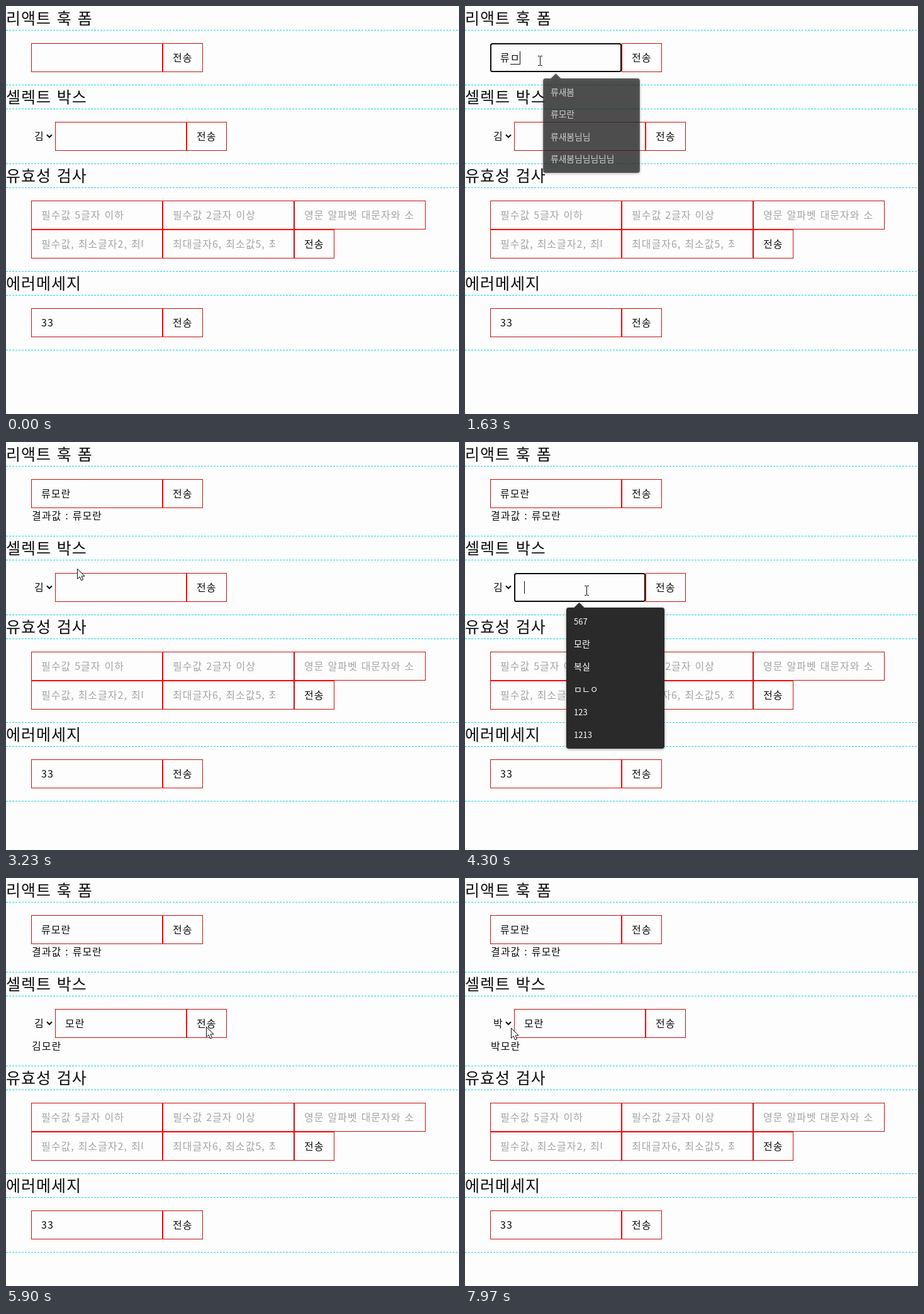
An HTML page with a canvas for the animation above (8000 ms loop, 720 by 648 pixels).

```html
<!DOCTYPE html>
<html lang="ko">
<head>
<meta charset="utf-8">
<style>
html, body { margin: 0; width: 100%; height: 100%; overflow: hidden; background: #fdfdfd; }
canvas { display: block; }
</style>
</head>
<body>
<canvas id="stage" width="720" height="648"></canvas>
<script>
const ctx = document.getElementById('stage').getContext('2d');
const LOOP = 8000;
const FONT = '"Noto Sans CJK KR", "Noto Sans CJK", "Noto Sans", sans-serif';
const PAPER = '#fdfdfd', INK = '#0c0c0c', HINT = '#a4a4a4', LINE = '#00d8e8';
const EDGE = '#c41414', SEAM = '#ff0000', POPUP = '#2a2a2a';
const INPUT_W = 209, BUTTON_W = 64, ROW_H = 46;

const SUBMIT_1 = 2750, SUBMIT_2 = 5850, SUBMIT_3 = 7460;
const MENU = ['김', '박', '말', '흉'];
const MENU_OPEN = [[3400, 3880], [6400, 7090]];

const TYPED_1 = [[640, ''], [1100, 'ㄹ'], [1220, '류'], [1570, '류ㅁ'], [1680, '류모'],
  [1760, '류몰'], [1820, '류모라'], [1890, '류모란']];
const TYPED_2 = [[4050, ''], [4500, 'ㅁ'], [4800, '모'], [4880, '몰'], [4950, '모라'], [5020, '모란']];

// Suggestion lists with their visible span and fade lengths
const POPUPS = [
  { x: 123, y: 114, from: 1230, to: 1578, fadeIn: 200, fadeOut: 200, items: ['류새봄', '류모란', '류새봄님님', '류새봄님님님님님'] },
  { x: 123, y: 114, from: 1780, to: 1930, fadeIn: 100, fadeOut: 200, items: ['류모란'] },
  { x: 161, y: 263, from: 4110, to: 4520, fadeIn: 170, fadeOut: 1, items: ['567', '모란', '복실', 'ㅁㄴㅇ', '123', '1213'] },
  { x: 161, y: 263, from: 4520, to: 4810, fadeIn: 1, fadeOut: 1, items: ['ㅁㄴㅇ'] },
  { x: 161, y: 263, from: 4810, to: 4908, fadeIn: 1, fadeOut: 200, items: ['모란'] }
];

// Pointer path: time, x, y
const PATH = [
  [30, 190, 12], [520, 119, 87], [2370, 119, 87], [2650, 285, 92], [2850, 285, 92],
  [3170, 130, 190], [3350, 66, 233], [3480, 66, 233], [3670, 64, 268], [3870, 64, 268],
  [4060, 193, 236], [5430, 193, 236], [5750, 318, 236], [5950, 318, 236], [6230, 95, 250],
  [6330, 66, 232], [6450, 66, 232], [6630, 75, 263], [6820, 62, 313], [7020, 66, 276],
  [7090, 66, 276], [7270, 318, 232], [7520, 318, 234], [7960, 73, 238]
];

const clamp = v => Math.max(0, Math.min(1, v));
const isOpen = t => MENU_OPEN.some(([a, b]) => t >= a && t < b);

function pointerAt(t) {
  let i = 0;
  while (i < PATH.length - 1 && PATH[i + 1][0] <= t) i++;
  const a = PATH[i], b = PATH[i + 1] || a;
  const p = clamp((t - a[0]) / (b[0] - a[0] || 1));
  const e = p * p * (3 - 2 * p);
  return { x: a[1] + (b[1] - a[1]) * e, y: a[2] + (b[2] - a[2]) * e };
}

function setFont(size, gap) {
  ctx.font = `${size}px ${FONT}`;
  ctx.letterSpacing = gap + 'px';
  ctx.wordSpacing = gap ? size * 0.09 + 'px' : '0px';
}

// y is the middle of the line
function text(str, x, y, { size = 16, color = INK, gap = 1 } = {}) {
  setFont(size, gap);
  ctx.fillStyle = color;
  ctx.fillText(str, x, y + size * 0.37);
}

function rect(x, y, w, h, color) {
  ctx.fillStyle = color;
  ctx.fillRect(x, y, w, h);
}

function dashes(y) {
  ctx.strokeStyle = LINE;
  ctx.setLineDash([3, 2]);
  ctx.beginPath();
  ctx.moveTo(0, y + 0.5);
  ctx.lineTo(720, y + 0.5);
  ctx.stroke();
  ctx.setLineDash([]);
}

function box(x, y, w) {
  ctx.strokeStyle = EDGE;
  ctx.lineWidth = 1;
  ctx.strokeRect(x + 0.5, y + 0.5, w - 1, ROW_H - 1);
}

// A run of inputs, optionally closed by the submit button
function fields(x, y, inputs, button = true) {
  const widths = Array(inputs).fill(INPUT_W).concat(button ? BUTTON_W : []);
  widths.forEach((w, i) => {
    box(x, y, w);
    if (i === 1) rect(x - 1, y, 2, ROW_H, SEAM);
    x += w;
  });
  if (button) text('전송', x - BUTTON_W + 16, y + 23);
}

function hint(str, x, y, room) {
  ctx.save();
  ctx.beginPath();
  ctx.rect(x + 16, y, room, ROW_H);
  ctx.clip();
  text(str, x + 16, y + 23, { color: HINT });
  ctx.restore();
}

function title(str, y) {
  text(str, 0, y + 20, { size: 25 });
  dashes(y + 38);
}

function entry(x, y, steps, t, blurAt) {
  const now = steps.filter(s => t >= s[0]).pop();
  if (!now) return;
  const value = now[1], left = x + 16;
  if (t < blurAt) {
    rect(x, y, INPUT_W, ROW_H, PAPER);
    ctx.strokeStyle = INK;
    ctx.lineWidth = 2;
    ctx.beginPath();
    ctx.roundRect(x + 1, y + 1, INPUT_W - 2, ROW_H - 2, 2.5);
    ctx.stroke();
    ctx.lineWidth = 1;
    setFont(16, 1);
    const end = left + ctx.measureText(value).width;
    const from = left + ctx.measureText(value.slice(0, -1)).width;
    if (value) rect(Math.round(from), y + 33, Math.round(end - from), 1, INK);
    if ((t - now[0]) % 1000 < 500) rect(Math.round(end), y + 13, 1, 20, INK);
  }
  text(value, left, y + 23);
}

function chevron(x, y) {
  ctx.strokeStyle = INK;
  ctx.lineWidth = 2;
  ctx.beginPath();
  ctx.moveTo(x - 4, y - 2);
  ctx.lineTo(x, y + 2);
  ctx.lineTo(x + 4, y - 2);
  ctx.stroke();
  ctx.lineWidth = 1;
}

function menu(pointerY) {
  const x = 40, y = 242, w = 38, h = 90;
  ctx.save();
  ctx.shadowColor = 'rgba(0,0,0,.45)';
  ctx.shadowBlur = 12;
  ctx.shadowOffsetX = ctx.shadowOffsetY = 2;
  rect(x, y, w, h, PAPER);
  ctx.restore();
  const hover = Math.max(0, Math.min(3, Math.floor((pointerY - 241) / 22)));
  rect(x + 1, y + 1 + hover * 22, w - 2, 22, '#1c63a8');
  MENU.forEach((name, i) =>
    text(name, x + 6, y + 12 + i * 22, { color: i === hover ? '#fff' : INK, gap: 0 }));
  ctx.strokeStyle = '#707070';
  ctx.strokeRect(x + 0.5, y + 0.5, w - 1, h - 1);
}

function popup(p, t) {
  const alpha = t < p.to ? clamp((t - p.from) / p.fadeIn) : 1 - clamp((t - p.to) / p.fadeOut);
  if (alpha <= 0) return;
  const w = 156, h = 8 + 36 * p.items.length, scale = 0.945 + 0.055 * alpha;
  ctx.save();
  ctx.globalAlpha = alpha;
  ctx.translate(p.x + w / 2, p.y + h / 2);
  ctx.scale(scale, scale);
  ctx.translate(-w / 2, -h / 2);
  ctx.fillStyle = POPUP;
  ctx.shadowColor = 'rgba(0,0,0,.4)';
  ctx.shadowBlur = 4;
  ctx.shadowOffsetY = 1;
  ctx.beginPath();
  ctx.roundRect(0, 0, w, h, 4);
  ctx.moveTo(12, 0.5);
  ctx.lineTo(20.5, -8);
  ctx.lineTo(29, 0.5);
  ctx.fill();
  ctx.shadowColor = 'transparent';
  p.items.forEach((item, i) =>
    text(item, 12, 22 + 36 * i, { size: /\d/.test(item) ? 13 : 14, color: '#fff', gap: 0 }));
  ctx.restore();
}

function beam(x, y) {
  ctx.save();
  ctx.translate(Math.round(x), Math.round(y));
  rect(0, -7, 1, 14, INK);
  for (const edge of [-8, 7]) {
    rect(-3, edge, 3, 1, INK);
    rect(1, edge, 3, 1, INK);
  }
  ctx.restore();
}

function arrow(x, y) {
  ctx.save();
  ctx.translate(Math.round(x) + 0.5, Math.round(y) + 0.5);
  ctx.beginPath();
  [[0, 0], [0, 16], [3.7, 12.5], [6.2, 18.5], [9, 17.3], [6.5, 11.6], [11.5, 11.6]]
    .forEach(([px, py]) => ctx.lineTo(px, py));
  ctx.closePath();
  ctx.fillStyle = '#fff';
  ctx.strokeStyle = INK;
  ctx.fill();
  ctx.stroke();
  ctx.restore();
}

function draw(t) {
  const pointer = pointerAt(t);
  const top2 = t >= SUBMIT_1 ? 149 : 125;
  const top3 = top2 + (t >= SUBMIT_2 ? 149 : 125);
  const top4 = top3 + 171, row2 = top2 + 59, row3 = top3 + 59;

  rect(0, 0, 720, 648, PAPER);
  [top2, top3, top4, top4 + 125].forEach(dashes);

  title('리액트 훅 폼', 0);
  fields(40, 59, 1);
  entry(40, 59, TYPED_1, t, SUBMIT_1 - 60);
  if (t >= SUBMIT_1) text('결과값 : 류모란', 41, 117);

  title('셀렉트 박스', top2);
  text(t >= 7090 ? '박' : '김', 45, row2 + 23, { gap: 0 });
  chevron(69, row2 + 22.5);
  fields(78, row2, 1);
  entry(78, row2, TYPED_2, t, SUBMIT_2 - 60);
  if (t >= SUBMIT_2) text((t >= SUBMIT_3 ? '박' : '김') + '모란', 41, 267);

  title('유효성 검사', top3);
  fields(40, row3, 3, false);
  fields(40, row3 + ROW_H, 2);
  rect(40, row3 + ROW_H - 1, 482, 2, SEAM);
  hint('필수값 5글자 이하', 40, row3, 177);
  hint('필수값 2글자 이상', 249, row3, 177);
  hint('영문 알파벳 대문자와 소', 458, row3, 177);
  hint('필수값, 최소글자2, 최대', 40, row3 + ROW_H, 162);
  hint('최대글자6, 최소값5, 최', 249, row3 + ROW_H, 164);

  title('에러메세지', top4);
  fields(40, top4 + 59, 1);
  text('33', 56, top4 + 82);

  POPUPS.forEach(p => popup(p, t));
  if (isOpen(t)) menu(pointer.y);

  if (t < 30) return;
  const over = (x, y) => pointer.x > x && pointer.x < x + INPUT_W && pointer.y > y && pointer.y < y + ROW_H;
  (over(40, 59) || over(78, row2) ? beam : arrow)(pointer.x, pointer.y);
}

const began = performance.now();
function tick() {
  draw((performance.now() - began) % LOOP);
  requestAnimationFrame(tick);
}
tick();
</script>
</body>
</html>
```
